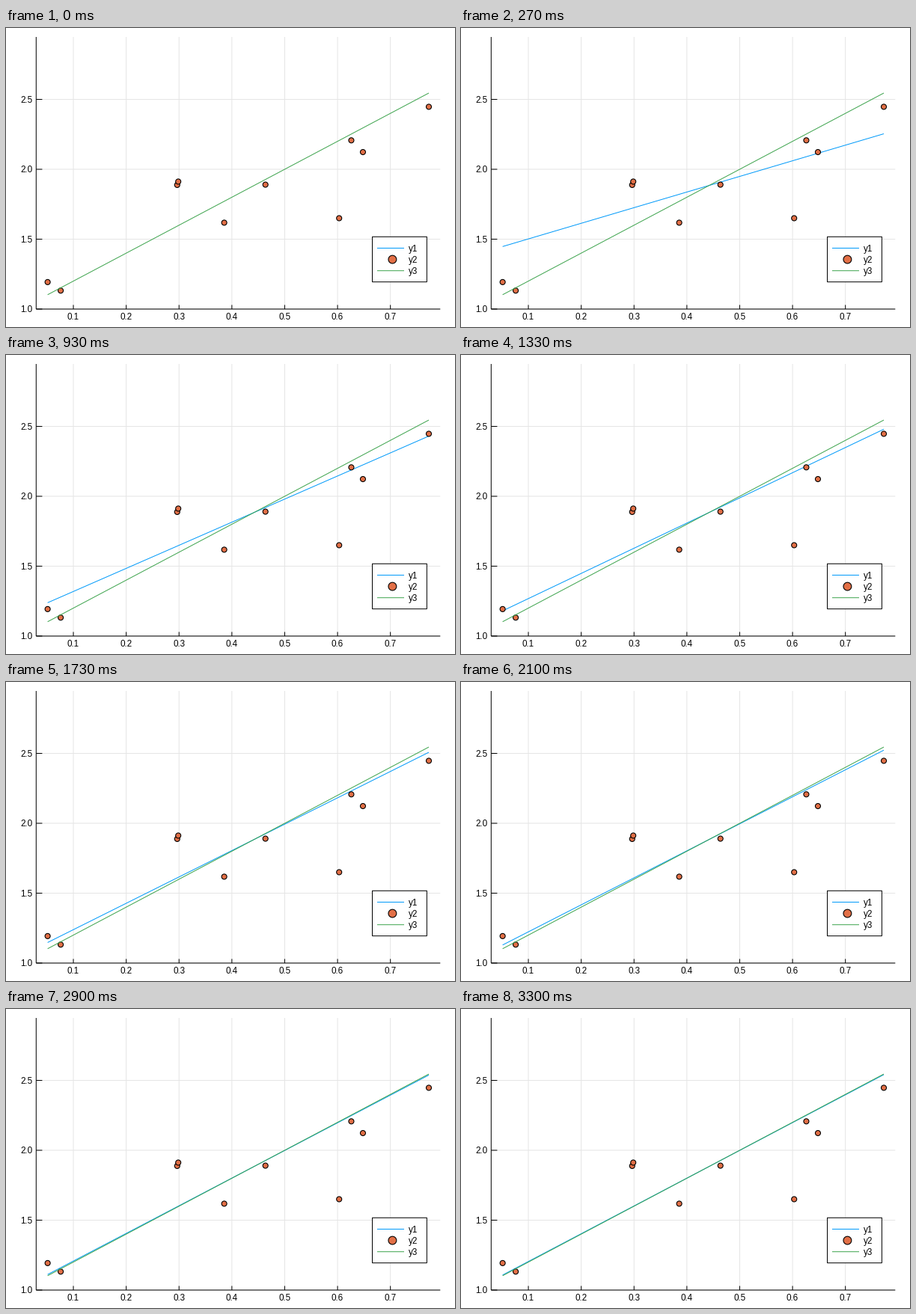
Recreate the animation shown at these times as a matplotlib script. Size 600x400 px, loop 3330 ms.

```python
import numpy as np
import matplotlib.pyplot as plt
from matplotlib.animation import FuncAnimation
from matplotlib.patches import Circle, Rectangle

W, H, DPI = 600, 400, 100
STEPS = 100
TICK_MS, TICKS = 10, 333  # the clock runs in hundredths of a second
PT = 72 / DPI  # points per pixel
BLUE, ORANGE, GREEN = "#009afa", "#e26f46", "#3ea44e"
GRID = "#e5e5e5"
LEFT, RIGHT, TOP, BOTTOM = 40.3, 580.3, 12, 376

plt.rcParams["font.family"] = "Liberation Sans"

xs = np.array([0.0513, 0.076, 0.2965, 0.2985, 0.3855,
               0.4635, 0.603, 0.626, 0.648, 0.7727])
ys = np.array([1.193, 1.132, 1.888, 1.912, 1.618,
               1.89, 1.65, 2.207, 2.123, 2.447])
ends = np.array([xs.min(), xs.max()])


def px(x):
    return 19.4 + 706.1 * np.asarray(x)


def py(y):
    return BOTTOM - 187 * (np.asarray(y) - 1)


def descend(w, b, rate=1.0):
    """Gradient descent towards y = 2x + 1; one (w, b) pair per step."""
    path = []
    for _ in range(STEPS):
        path.append((w, b))
        err = w * xs + b - (2 * xs + 1)
        w, b = w - rate * np.mean(err * xs), b - rate * np.mean(err)
    return path


fits = descend(0.125, 0.22)

fig = plt.figure(figsize=(W / DPI, H / DPI), dpi=DPI, facecolor="white")
ax = fig.add_axes([0, 0, 1, 1])
ax.set_xlim(0, W)
ax.set_ylim(H, 0)
ax.axis("off")


def line(x, y, color, z):
    return ax.plot(x, y, color=color, lw=PT, zorder=z, snap=False,
                   solid_capstyle="butt")[0]


def dot(x, y, r, z):
    ax.add_patch(Circle((x, y), r, fc=ORANGE, ec="black", lw=1.1 * PT,
                        zorder=z, snap=False))


def label(x, y, text, ha):
    ax.text(x, y, text, ha=ha, va="baseline", fontsize=11.6 * PT,
            color="black", zorder=12)


# grid, ticks and tick labels
for v in np.arange(1, 8) / 10:
    x = px(v)
    line([x, x], [TOP, BOTTOM], GRID, 1)
    line([x, x], [BOTTOM, BOTTOM - 5.5], "black", 2)
    label(x, 390, f"{v:.1f}", "center")
for v in (1.0, 1.5, 2.0, 2.5):
    y = py(v)
    line([LEFT, RIGHT], [y, y], GRID, 1)
    line([LEFT, LEFT + 8.1], [y, y], "black", 2)
    label(35, y + 4.2, f"{v:.1f}", "right")
line([LEFT, LEFT], [TOP, BOTTOM], "black", 2)
line([LEFT, RIGHT], [BOTTOM, BOTTOM], "black", 2)

# data
fit = line([], [], BLUE, 4)
fit.set_clip_path(Rectangle((LEFT, TOP), RIGHT - LEFT, BOTTOM - TOP,
                            transform=ax.transData))
for x, y in zip(px(xs), py(ys)):
    dot(x, y, 3.5, 5)
line(px(ends), py(2 * ends + 1), GREEN, 6)

# legend
ax.add_patch(Rectangle((489.5, 279.3), 72.9, 60.4, fc="white", ec="black",
                       lw=PT, zorder=10, snap=False))
line([496, 532], [294.5, 294.5], BLUE, 11)
dot(516.4, 309.6, 5.4, 11)
line([496, 532], [324.7, 324.7], GREEN, 11)
for i in range(3):
    label(538, 298.7 + 15.1 * i, f"y{i + 1}", "left")


def update(tick):
    # each step begins at the tick nearest to its ideal time
    w, b = fits[int((tick + 0.5) * 0.3)]
    fit.set_data(px(ends), py(w * ends + b))
    return (fit,)


anim = FuncAnimation(fig, update, frames=TICKS, interval=TICK_MS,
                     repeat=True, repeat_delay=0, blit=False)
plt.show()
```
